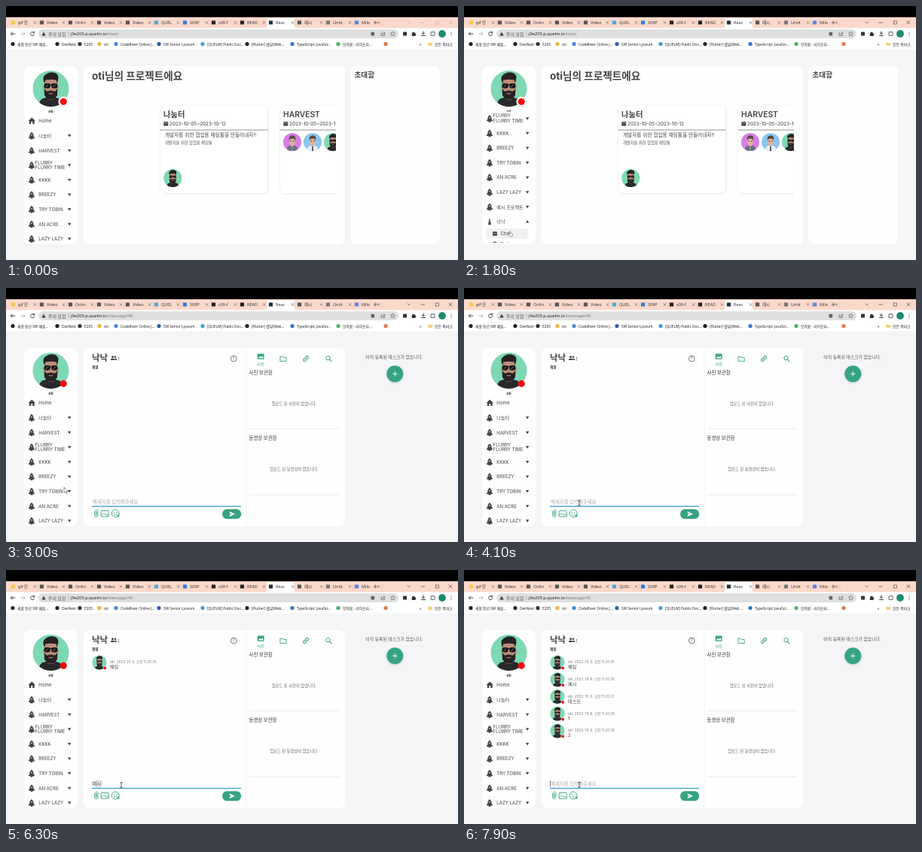
These frames come from a looping animation (600x338 px, 8 s). An HTML page:

```html
<!DOCTYPE html>
<html lang="ko">
<head>
<meta charset="utf-8">
<style>
html, body { margin: 0; width: 100%; height: 100%; overflow: hidden; background: #f5f5f7; }
svg { display: block; width: 100vw; height: 100vh; }
text { font-family: Inter, "Noto Sans CJK KR", "Noto Sans CJK", sans-serif; white-space: pre; }
.chrome text { font-family: "Noto Sans", "Noto Sans CJK KR", "Noto Sans CJK", sans-serif; }
</style>
</head>
<body>
<svg id="stage" viewBox="0 0 600 338"></svg>
<script>
const LOOP = 8000, GREEN = '#36a383', INK = '#444', USER = 'oti';
const FOCUS = 350, NAV = 2600, OPEN = 1500, ROW = 19.6;

const text = (x, y, size, str, fill = INK, extra = '') =>
  `<text x="${x}" y="${y}" font-size="${size}" fill="${fill}" ${extra}>${str}</text>`;
const rect = (x, y, w, h, fill, r = 0, extra = '') =>
  `<rect x="${x}" y="${y}" width="${w}" height="${h}" rx="${r}" fill="${fill}" ${extra}/>`;
const dot = (x, y, r, fill, extra = '') => `<circle cx="${x}" cy="${y}" r="${r}" fill="${fill}" ${extra}/>`;
const path = (d, fill, extra = '') => `<path d="${d}" fill="${fill}" ${extra}/>`;
const line = (d, color, w = 1, extra = '') =>
  path(d, 'none', `stroke="${color}" stroke-width="${w}" stroke-linecap="round" stroke-linejoin="round" ${extra}`);
const at = (x, y, body, scale = 1, id = '') =>
  `<g ${id && `id="${id}"`} transform="translate(${x} ${y}) scale(${scale})">${body}</g>`;
const group = (id, body, extra = '') => `<g id="${id}" ${extra}>${body}</g>`;
const BOLD = 'font-weight="700"', SEMI = 'font-weight="600"', MEDIUM = 'font-weight="500"', MID = 'text-anchor="middle"';

// Avatars, drawn for a radius of 24
const beardedMan = dot(0, 0, 24, '#7dd8b3') + `<g clip-path="url(#round)">` +
  path('M-16 25Q-17 14-7 12H7Q17 14 16 25Z', '#28292d') + rect(-4.5, 7, 9, 8, '#8d6454', 3) +
  rect(-8.5, -14, 17, 23, '#bd8c75', 7) + dot(-9, -2, 1.8, '#bd8c75') + dot(9, -2, 1.8, '#bd8c75') +
  path('M-9-1Q-7 4-4 3.4Q0 1.5 4 3.4Q7 4 9-1L8.5 9Q5 14.5 0 14.5Q-5 14.5-8.5 9Z', '#252224') +
  path('M-8.5-7Q-12-15-8-18Q-3-23 4-21.5Q11-20 9.8-13L8.5-7L7-11.5Q0-13-7-11.5Z', '#252224') +
  rect(-9, -7, 8.2, 6.4, '#151518', 2.4) + rect(.8, -7, 8.2, 6.4, '#151518', 2.4) + rect(-3, -6, 6, 1.3, '#151518') +
  line('M-6.5-2.2l2.5-3M3.3-2.2l2.5-3', '#8b8b92', .9) + line('M-2.3 6.4Q0 7.3 2.3 6.4', '#b07d72', 1.2) + '</g>';
const youngMan = (bg, hair, shirt, tie) => dot(0, 0, 24, bg) + `<g clip-path="url(#round)">` +
  path('M-15 25Q-15 10-4 9H4Q15 10 15 25Z', shirt) + path('M-1.5 11H1.5L2 25H-2Z', tie) +
  rect(-3.5, 4, 7, 8, '#dba88c', 3) + rect(-7, -11, 14, 19, '#e9bda3', 6.5) +
  path('M-7.5-3Q-11-14-4-16.5Q2-19 7-15Q10-11 7.5-3L6-8Q0-10.5-6-8Z', hair) +
  line('M-5-3.5H-2M2-3.5H5', '#4a3c3a', 1.2) + dot(-3.4, -1, 1.2, '#333') + dot(3.4, -1, 1.2, '#333') +
  line('M-2 4.5Q0 5.5 2 4.5', '#b5685c', 1.1) + '</g>';

const rocket = path('M0-4.8Q2.9-2.6 2.6 .8L3.9 2.4V3.6H1.8L1.1 4.9H-1.1L-1.8 3.6H-3.9V2.4L-2.6 .8Q-2.9-2.6 0-4.8Z', INK) + dot(0, -1, .8, '#fff');
const launched = path('M0-4.5Q1.7-2 1.5 2L2.1 4H-2.1L-1.5 2Q-1.7-2 0-4.5Z', INK) + dot(0, -1.2, .7, '#fff');
const caretDown = path('M-2.2-1.5H2.2L0 2Z', INK);
const house = path('M-4.7 0L0-4.4L4.7 0H3.4V4.1H1V1H-1V4.1H-3.4V0Z', INK);
const calendar = rect(-3, -2.4, 6, 5.2, INK, .7) + line('M-1.6-3V-2M1.6-3V-2', INK, .8) + line('M-2.4-.9H2.4', '#fff', .4);

function chrome() {
  const tabs = [['gif 만', '#f2c94c'], ['Video', '#555'], ['Onlin', '#555'], ['Video', '#555'], ['Video', '#555'],
    ['QUEL', '#4aa8e0'], ['S09P', '#2f7de1'], ['s09-f', '#222'], ['READ', '#222'], ['Reac', '#21303a'],
    ['예시', '#555'], ['Untit', '#777'], ['Milo', '#5b83e8']];
  const marks = [[9, '새봄 청년 SW 배움...', '#222'], [68, 'DevNest', '#222'], [98, 'E205', '#333'], [124, USER, '#e8b53c'],
    [146, 'CodeRiver Online J...', '#4a86d8'], [203, 'SW Senior Lyceum', '#2c5fa8'], [261, '[QUELM] Public Doc...', '#3f9ddb'],
    [320, '[Flutter] 웹뷰(Web...', '#222'], [380, 'TypeScript: JavaScr...', '#3178c6'], [441, '모아봄 - 라이프타...', '#45b36b'],
    [504, '', '#e2764a']];
  const tab = ([name, color], i) => {
    const x = 9.5 + i * 38;
    return (i == 9 ? path(`M${x - 8} 29.5Q${x - 5} 29 ${x - 5} 25V18Q${x - 5} 16 ${x - 3} 16H${x + 29}Q${x + 31} 16 ${x + 31} 18V25Q${x + 31} 29 ${x + 34} 29.5Z`, '#fff')
      : line(`M${x + 33.5} 19.5V25.5`, '#d3aa98', .4)) +
      rect(x - 2.6, 19.4, 5.2, 5.2, color, .4) + text(x + 6.5, 24, 5.5, name, '#393432') +
      line(`M${x + 27.6} 20.6l2.8 2.8m0-2.8l-2.8 2.8`, '#5b4d47', .6);
  };
  const mark = ([x, name, color]) => dot(x, 50.6, 2.6, color) + text(x + 6, 52.5, 4.8, name, '#222');
  return rect(0, 0, 600, 15, '#000') + rect(0, 15, 600, 14.5, '#fbd9ca') + tabs.map(tab).join('') +
    line('M488 22h4.4m-2.2-2.2v4.4', '#453a36', .7) +
    group('windowButtons', line('M533 21l1.8 1.8l1.8-1.8M551 22h4.5M588 19.8l4 4m0-4l-4 4', '#453a36', .7) +
      rect(570.5, 20, 4, 4, 'none', 0, 'stroke="#453a36" stroke-width=".6"')) +
    rect(0, 29.5, 600, 28, '#fff') + rect(43, 31, 478, 12, '#dedfe1', 6) +
    line('M12 37H6.5m2.2-2.2L6.5 37l2.2 2.2M37.3 35.5a2.6 2.6 0 1 0 .4 2.2M37.5 34v1.8h-1.8', '#333', .9) +
    line('M19.5 37H25m-2.2-2.2L25 37l-2.2 2.2', '#aaa', .8) +
    path('M50 34.5L52.8 39.6H47.2Z', '#444') + text(56, 39.5, 6, '주의 요함', '#555') + line('M83 34.5v5', '#888', .5) +
    `<text x="86" y="39.4" font-size="5.7" fill="#222">j9e205.p.quelm.io<tspan id="route" fill="#777"></tspan></text>` +
    rect(484.5, 34.8, 4.6, 4.6, '#666', .7) + line('M499 36h-1v3.4h4.5V38M500 37.8q.3-2 2.8-2m-1.2-1.2l1.3 1.2l-1.3 1.2', '#555', .7) +
    path('M513.5 33.8l.9 2.1 2.2.2-1.7 1.5.5 2.2-1.9-1.2-1.9 1.2.5-2.2-1.7-1.5 2.2-.2z', 'none', 'stroke="#555" stroke-width=".6"') +
    rect(527, 34.5, 5, 5, '#333', .6) + path('M538.8 35.5h1.3a1 1 0 0 1 2 0h1.3v1.4a1 1 0 0 1 0 2v1.2h-4.6z', '#333') +
    line('M554 34v3.5m-1.6-1.5l1.6 1.6l1.6-1.6M551.5 39.5h5', '#222', .9) +
    rect(564, 34.6, 5, 4.8, 'none', .5, 'stroke="#333" stroke-width=".8"') + dot(579, 37, 4.9, '#1f8a70') +
    [35, 37, 39].map(y => dot(591, y, .6, '#333')).join('') +
    marks.map(mark).join('') + text(548.5, 52.8, 6, '»', '#444') +
    path('M560.5 48.4h2l.7.8h2.8v3.6h-5.5z', '#f2cf63') + text(569, 52.5, 4.9, '모든 북마크', '#222');
}

function sidebar() {
  const projects = ['나눔터', 'HARVEST', '', 'KKKK', 'BREEZY', 'TRY TOBIN', 'AN ACRE', 'LAZY LAZY', '예시 프로젝트', '낙낙'];
  const row = (name, i) => {
    const y = 172.6 + i * ROW, last = i == projects.length - 1;
    const label = name ? text(43.3, y + 2.3, 6.1, name)
      : text(38.6, y - 1.3, 6.1, 'FLURRY') + text(38.6, y + 5.6, 6.1, 'FLURRY TIME');
    return at(34, y, rocket, 1, last ? 'lastRocket' : '') + label + at(84.2, y, caretDown, 1, last ? 'lastCaret' : '');
  };
  const icons = [
    rect(-3, -2.8, 6, 5.6, INK, 1) + dot(-1.2, 0, .6, '#fff') + dot(1.2, 0, .6, '#fff'),
    rect(-2.6, -2.5, 5.2, 5.3, 'none', .6, `stroke="${INK}" stroke-width=".8"`) + line('M-1.2 0l1 1l1.6-1.8M-1-3H1', INK, .8),
    dot(0, -.8, 2.2, INK) + rect(-1, 1, 2, 2.2, INK, .5),
    dot(0, 0, 3, INK) + line('M0-3V0L2.2 2', '#fff', .7)
  ];
  const sub = ['Chat', 'Task', 'Board', 'Analysis'].map((name, i) =>
    at(41, 365 + i * 14.1, icons[i]) + text(48.4, 367.3 + i * 14.1, 6.1, name)).join('');
  return rect(24, 80, 71, 237, '#fefefe', 8) +
    text(59.5, 142, 5.2, USER, '#222', BOLD + MID) +
    rect(25, 140.5, 69, 10, '#fefefe', 0, 'id="nameCover"') +
    `<g clip-path="url(#listClip)">` + group('list',
      at(34.3, 153, house) + text(43.3, 155.3, 6.2, 'Home') + projects.map(row).join('') +
      group('sub', rect(29.5, 358.4, 55, 13.4, '#f0f0f1', 1, 'id="hover"') + sub)) + '</g>' +
    at(59.5, 110, beardedMan) + dot(76.3, 127.2, 6.6, '#fff', 'id="statusRing" stroke="#ccc" stroke-width=".7"') + dot(76.3, 127.2, 4.5, '#f80808');
}

function home() {
  const card = (x, title, body) => rect(x, 133, 142, 116, '#fff', 8, 'filter="url(#cardShadow)"') +
    text(x + 4, 148, 10.3, title, INK, SEMI) + at(x + 7.3, 156.7, calendar) +
    text(x + 12, 159, 6.3, '2023-10-05~2023-10-12', '#555', MEDIUM) + line(`M${x} 165h142`, '#777', .8) + body;
  return rect(103, 80, 347, 237, '#fefefe', 8) + rect(457, 80, 119, 237, '#fefefe', 8) +
    text(114, 98, 13.6, USER + '님의 프로젝트에요', INK, BOLD) + text(462.5, 94.5, 9.6, '초대함', INK, BOLD) +
    `<g clip-path="url(#cardClip)">` +
    card(205, '나눔터', text(211, 174.3, 6.65, '개발자를 위한 협업용 채팅툴을 만들어내자!!') +
      text(211, 183.5, 5.3, '개발자를 위한 협업용 채팅툴', '#555', MEDIUM) + at(221.3, 229, beardedMan, .5)) +
    card(364, 'HARVEST', at(380, 181, youngMan('#d67de3', '#5f4750', '#6a6f80', '#8d93a2'), .5) +
      at(407, 181, youngMan('#8bc6ee', '#54473f', '#e9eef4', '#3e4c68'), .5) + at(434, 181, beardedMan, .5)) + '</g>';
}

function chat() {
  const pic = (w, h) => rect(-w, -h, 2 * w, 2 * h, 'none', .8, `stroke="${GREEN}" stroke-width=".9"`) +
    line(`M${-w} ${h - 1}L${-w / 3} -.5L${w / 3} ${h - 2}L${w / 2} .5L${w} ${h - 1}`, GREEN, .8);
  const message = (str, i) => {
    const y = 123 + i * 22.75;
    return group('msg' + i, at(124, y, beardedMan, .4) + dot(131.2, y + 7.4, 2.5, '#fff') + dot(131.2, y + 7.4, 1.9, '#f80808') +
      text(138, y + 1.4, 5, USER, '#666') + text(147, y + 1.4, 4.5, '2023. 10. 6. 오전 11:20:' + [35, 36, 37, 38, 38][i], '#777') +
      text(138, y + 8.3, 6.2, str));
  };
  return rect(103, 80, 347, 237, '#fefefe', 8) + line('M318.7 80V317', '#ececee', .7) +
    text(114, 96.5, 11.5, '낙낙', INK, BOLD) + dot(141.5, 91.7, 1.5, INK) + dot(145, 91.7, 1.3, INK) +
    path('M138.8 96q0-2.3 2.7-2.3T144.3 96zM144.7 96q0-1.5-.7-2.2q3.2-.5 3.2 2.2z', INK) + text(148.3, 96.6, 5.8, '1', '#555') +
    text(114, 107.2, 4.6, '개설', '#222', BOLD) +
    dot(302.3, 94, 3.9, 'none', 'stroke="#555" stroke-width=".8"') + text(302.3, 96, 5.6, '?', '#555', MID) +
    path('M333.8 87.5h8.8v7.3h-8.8z', GREEN) + path('M334.8 93.5l2.2-2.7 1.6 1.5 1.5-2 1.8 3.2z', '#fff') +
    text(338.2, 102.5, 5, '사진', GREEN, MID) +
    line('M364.3 91.2h3l1 1.2h3.9v5h-7.9z', GREEN, .9) +
    at(398, 94, `<g transform="rotate(-45)">` + line('M-.7-1.7H-2.6a1.7 1.7 0 0 0 0 3.4H-.7M.7-1.7H2.6a1.7 1.7 0 0 1 0 3.4H.7M-1.5 0H1.5', GREEN, 1) + '</g>') +
    dot(427.5, 93.2, 2.7, 'none', `stroke="${GREEN}" stroke-width="1"`) + line('M429.6 95.3l2.5 2.5', GREEN, 1.1) +
    text(322.5, 114.5, 6.4, '사진 보관함', '#333', MEDIUM) + text(382.5, 155.8, 5.3, '업로드 된 사진이 없습니다.', '#666', MID) +
    text(322.5, 202.2, 6.4, '동영상 보관함', '#333', MEDIUM) + text(382.5, 243, 5.3, '업로드 된 동영상이 없습니다.', '#666', MID) +
    line('M323 187.3H442M323 275.2H442', '#e4e4e6', .7) +
    text(515.5, 94, 5.85, '아직 등록된 태스크가 없습니다.', '#555', MID + ' ' + MEDIUM) +
    dot(516.3, 114.3, 11, GREEN, 'filter="url(#shadow)"') + line('M513.5 114.3h5.6m-2.8-2.8v5.6', '#fff', .9) +
    ['채팅', '예시', '테스트', '1', '2'].map(message).join('') +
    text(115, 286.8, 6.4, '메세지를 입력해주세요', '#aaa', 'id="hint"') +
    rect(0, 280.5, 6, 8, '#eee', 0, 'id="compose" stroke="#999" stroke-width=".4"') + text(114.3, 286.8, 6.4, '', INK, 'id="typed"') +
    line('M114.5 280.5v8', '#333', .6, 'id="caret"') + rect(114, 289.9, 198, 1.3, '#3c9bd3') +
    line('M117.6 297v5.5a2.2 2.2 0 0 0 4.4 0v-6a1.5 1.5 0 0 0-3 0v5.5a.7.7 0 0 0 1.5 0V297.5', GREEN, .8) +
    at(131.2, 300.3, pic(5, 3.9)) + dot(145.2, 300, 4.9, 'none', `stroke="${GREEN}" stroke-width=".9"`) +
    dot(143.4, 299, .7, GREEN) + dot(147, 299, .7, GREEN) + line('M143 301.5q2 2 4 0', GREEN, .8) + dot(149, 303, 1.5, GREEN) +
    rect(287, 294.3, 25.3, 13, GREEN, 6.5) + path('M296.5 297.3L304 300.8L296.5 304.3L297.3 301.4L301 300.8L297.3 300.2Z', '#fff');
}

const outline = 'stroke="#444" stroke-width=".6" stroke-linejoin="round"';
const pointers = group('hand', at(0, 0, path('M-.9 0q.9-1 1.7 0V3l3 .7q.9.3.8 1.3L4 8.3H0L-2.6 5.2q0-1 1-.7l.7.6z', '#fff', outline), .8)) +
  group('arrow', path('M0 0V7.4L1.8 5.8L3 8.3L4.2 7.8L3.1 5.3H5.4Z', '#fff', outline)) +
  group('beam', line('M-1.2-3.2H1.2M0-3.2V3.2M-1.2 3.2H1.2', '#222', .7));

document.getElementById('stage').innerHTML = `<defs>
  <clipPath id="round"><circle r="24"/></clipPath>
  <clipPath id="listClip"><rect x="25" y="141" width="69" height="174"/></clipPath>
  <clipPath id="cardClip"><rect x="190" y="120" width="248" height="140"/></clipPath>
  <filter id="shadow" x="-20%" y="-20%" width="140%" height="150%"><feDropShadow dx="0" dy="1" stdDeviation="1.6" flood-opacity=".2"/></filter>
  <filter id="cardShadow" x="-10%" y="-10%" width="120%" height="120%"><feDropShadow dx=".5" dy=".5" stdDeviation="1.6" flood-opacity=".14"/></filter>
  </defs>` + rect(0, 0, 600, 338, '#f5f5f7') + group('home', home()) + group('chat', chat()) + sidebar() +
  `<g class="chrome">${chrome()}</g>` + group('pointer', pointers);

const el = {};
document.querySelectorAll('[id]').forEach(node => el[node.id] = node);
const show = (node, on) => node.setAttribute('display', on ? 'inline' : 'none');
const place = (node, x, y) => node.setAttribute('transform', `translate(${x} ${y})`);
const ramp = (t, a, b) => { const p = Math.min(1, Math.max(0, (t - a) / (b - a))); return p * p * (3 - 2 * p); };

const trail = [[250, 60, 250], [700, 60, 253], [1100, 60, 253], [1400, 61, 300], [1800, 61, 300], [2150, 61, 273],
  [2350, 61, 273], [2520, 58, 260], [2800, 58, 260], [3500, 153, 286]];
function pointerAt(t) {
  const i = trail.findIndex(p => p[0] > t);
  if (i < 0) return trail[trail.length - 1].slice(1);
  const b = trail[i], a = trail[Math.max(0, i - 1)], k = ramp(t, a[0], b[0]);
  return [a[1] + (b[1] - a[1]) * k, a[2] + (b[2] - a[2]) * k];
}

// Each entry: first key, key interval, time of sending, syllables as they compose
const entries = [
  [4620, 120, 5320, ['ㅊ', '채', '챝', '채티', '채팅']],
  [5650, 140, 6420, ['ㅇ', '예', '옛', '예시']],
  [6560, 110, 7300, ['ㅌ', '테', '텟', '테스', '테슽', '테스트']],
  [7440, 100, 7600, ['1']],
  [7740, 100, 7860, ['2']]
];

function render(t) {
  const inChat = t >= NAV, opened = t >= OPEN && !inChat;
  show(el.home, !inChat);
  show(el.chat, inChat);
  show(el.statusRing, !inChat);
  el.route.textContent = inChat ? '/message/40' : '/main';
  el.windowButtons.setAttribute('opacity', t < FOCUS ? .3 : 1);

  const scroll = inChat ? 0 : 47.3 * ramp(t, 350, 850) + 56 * ramp(t, 1700, 2000);
  place(el.list, 0, -scroll);
  show(el.nameCover, scroll > 1);
  show(el.sub, opened);
  el.lastRocket.innerHTML = opened ? launched : rocket;
  el.lastCaret.innerHTML = opened ? `<g transform="scale(1 -1)">${caretDown}</g>` : caretDown;

  const [x, y] = pointerAt(t);
  const hovered = Math.round((y + 2 + scroll - 365) / 14.1);
  show(el.hover, opened && hovered >= 0 && hovered < 4);
  place(el.hover, 0, hovered * 14.1);
  place(el.pointer, x, y);
  const overInput = inChat && x > 114 && y > 278;
  show(el.hand, t >= 250 && !inChat);
  show(el.arrow, inChat && !overInput);
  show(el.beam, overInput);

  let typed = '';
  entries.forEach(([start, step, sent, keys], i) => {
    show(el['msg' + i], t >= sent);
    if (t >= start && t < sent) typed = keys[Math.min(keys.length - 1, Math.floor((t - start) / step))];
  });
  const composing = /[ㄱ-힣]$/.test(typed);
  el.typed.textContent = typed;
  show(el.hint, !typed);
  show(el.compose, composing);
  el.compose.setAttribute('x', 114.3 + (typed.length - 1) * 5.9);
  place(el.caret, typed ? 4.2 : 0, 0);
  show(el.caret, t > 4200 && !composing && (t > 7300 || (t - 5320 + LOOP) % 1000 < 500));
}

(function frame() {
  render(performance.now() % LOOP);
  requestAnimationFrame(frame);
})();
</script>
</body>
</html>
```
